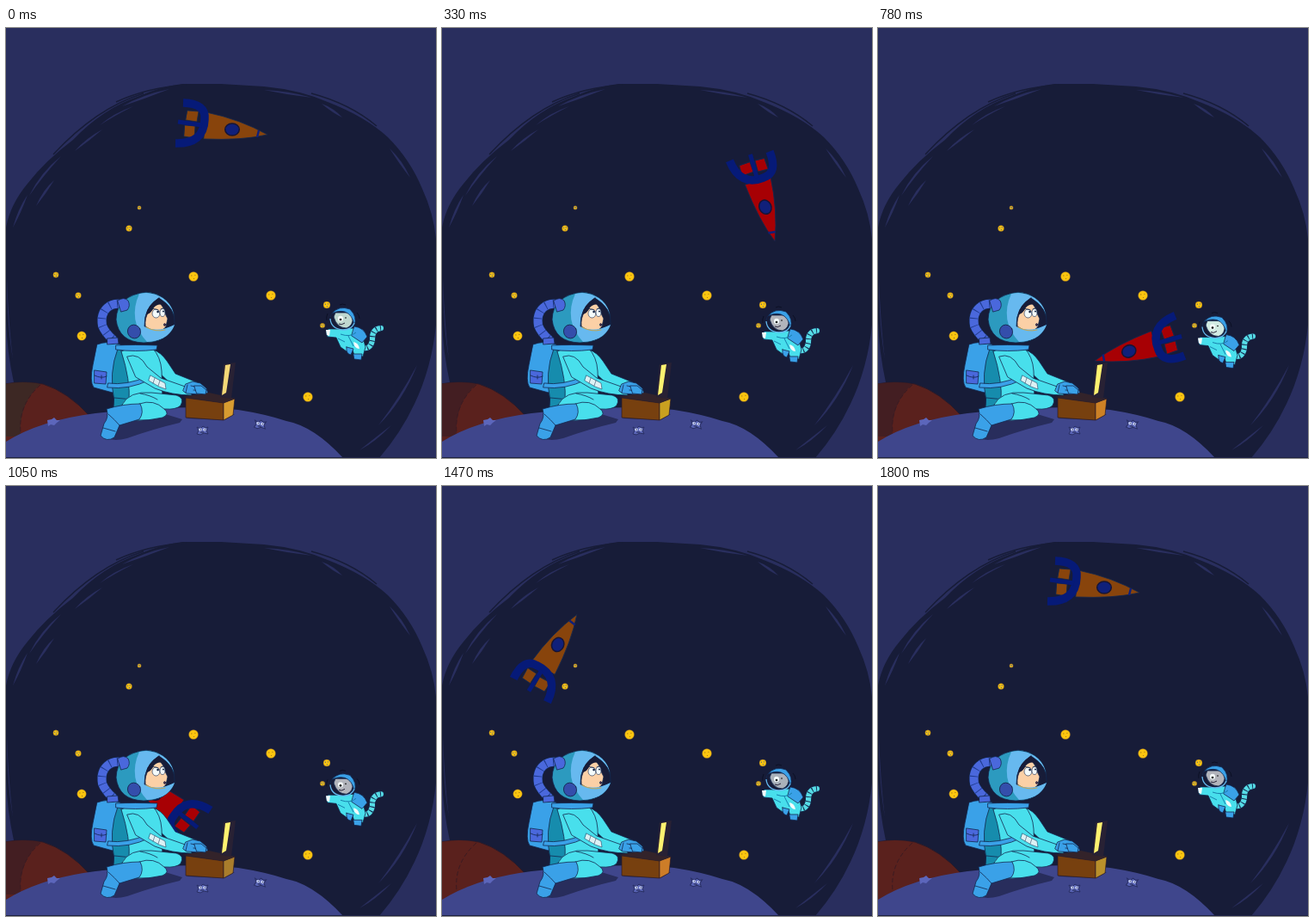
Recreate the animation shown at these times as an HTML page. Size 500 by 500 pixels, loop 1830 ms.

```html
<!DOCTYPE html>
<html lang="en">
<head>
<meta charset="utf-8">
<title>Astronaut and orbiting rocket</title>
<style>
  html, body { margin: 0; width: 100%; height: 100%; overflow: hidden; background: #292e5e; }
  svg { display: block; width: 100vw; height: 100vh; }
  .ink { stroke: #14284e; stroke-width: .8; stroke-linejoin: round; stroke-linecap: round; }
  .line { fill: none; }
  .cyan { fill: #48dfec; }
  .teal { fill: #168cad; }
  .blue { fill: #3aa1e8; }
  .indigo { fill: #4a68dc; }
  .night { fill: #171c38; }
  .white { fill: #f4fbfb; }
</style>
</head>
<body>
<svg viewBox="0 0 500 500">
  <rect width="500" height="500" fill="#292e5e"/>

  <!-- Sky with brushed rim -->
  <path class="night" d="M0 232Q5 205 25 181Q46 154 78 130Q112 94 155 79Q180 68 205 65L250 65L300 68Q342 72 374 86Q418 103 444 127Q470 153 484 187Q497 215 500 245V345Q495 395 475 437Q459 471 434 500H60L9 412Q1 375 0 340Z"/>
  <g fill="#292e5e">
    <path d="M135 91Q160 77 190 71Q162 82 135 91ZM109 113Q125 99 148 91Q126 102 109 113ZM300 72Q328 73 356 81Q328 78 300 72ZM367 88Q381 93 391 104Q380 99 367 88ZM27 195Q40 168 64 149Q43 172 27 195ZM35 207Q43 188 56 177Q47 192 35 207ZM80 143Q93 128 112 118Q97 131 80 143ZM446 140Q461 154 470 174Q458 159 446 140ZM8 232Q14 210 25 194Q18 214 8 232Z"/>
    <path d="M1 290Q1 345 8 385Q3 345 1 290ZM478 392Q462 433 433 462Q457 431 478 392ZM448 462Q430 481 411 491Q431 475 448 462Z"/>
  </g>
  <path class="line" stroke="#171c38" stroke-width="1.500" d="M55 147Q105 93 160 76M128 86Q165 69 210 66M355 76Q400 88 431 114"/>

  <g id="stars"></g>

  <g id="rocket">
    <path class="body ink" d="M211 96L224 97L222 109L209 107ZM208 113L220 114L219 128L207 126Z"/>
    <path class="body ink" d="M233 98Q272 106 304 124Q274 131 230 129Z"/>
    <path class="line" stroke="#061a78" stroke-width="9.500" d="M206 87Q233 88 231 106Q230 135 197 134"/>
    <path class="line" stroke="#061a78" stroke-width="5" d="M200 109L228 113"/>
    <ellipse cx="263" cy="118" rx="8.300" ry="7" fill="#10207a" stroke="#161536" stroke-width="1.500"/>
    <path class="line" stroke="#10207a" stroke-width="2.500" d="M294 119L292 127"/>
  </g>

  <!-- Hill and ground -->
  <path fill="#5a211d" stroke="#2b1a28" d="M-2 414Q20 410 43 414Q72 423 98 452L80 490H-2Z"/>
  <path id="shade" d="M-1 414Q20 410 40 414Q14 438 17 475H-1Z"/>
  <path class="line" stroke="#3a1b22" d="M40 415Q14 438 17 470" stroke-dasharray="5 3"/>
  <path fill="#3f468c" d="M0 481Q40 456 104 448Q200 437 270 444Q302 449 326 457Q358 463 392 500H0Z"/>
  <path fill="#282d5c" d="M112 474Q122 482 141 477Q172 466 202 459L205 455L182 448L130 455Z"/>
  <path fill="#282d5c" d="M209 454L254 456L266 449L230 447Z"/>
  <rect y="499" width="500" height="1" fill="#1d2143"/>
  <path fill="#5c66bb" d="M48 456L53 455L56 453L59 456L63 456L59 459L56 462L52 461L49 463Z"/>
  <g id="critters"></g>

  <!-- Cat -->
  <g id="cat">
    <g class="line">
      <path stroke="#14284e" stroke-width="7.500" stroke-linecap="round" d="M415 372Q424 374 426 363Q425 350 436 349"/>
      <path stroke="#56dce6" stroke-width="6" stroke-linecap="round" d="M415 372Q424 374 426 363Q425 350 436 349"/>
      <path stroke="#14284e" stroke-width="6" stroke-dasharray="1 4" d="M415 372Q424 374 426 363Q425 350 436 349"/>
    </g>
    <path class="cyan ink" d="M386 350L404 349Q416 358 418 371L415 382L405 381L403 374L396 376L389 371L384 360L374 359Q370 352 375 350Z"/>
    <path class="blue ink" d="M405 347Q416 348 420 359L414 366L402 358Z"/>
    <path class="white" d="M372 351L377 351L376 358L373 357ZM404 365Q410 366 411 373Q405 373 404 365Z"/>
    <path class="line" stroke="#1780ad" d="M389 356Q400 360 407 354M398 358L404 370M386 361L394 365"/>
    <path class="blue ink" d="M396 371L404 373L401 380Q395 379 396 371ZM404 379L414 379L413 386L405 385Z"/>
    <ellipse class="night ink" cx="391" cy="338" rx="14" ry="12.500"/>
    <path id="face" class="ink" d="M381 336L383 331L388 331L395 331L401 331L403 336Q404 346 396 349Q385 349 381 336Z"/>
    <path class="blue ink" d="M379 332Q387 322 400 327Q409 336 405 346Q403 333 394 330Q386 328 379 332Z"/>
    <ellipse class="white" cx="389" cy="338" rx="3" ry="3.200"/>
    <circle cx="389" cy="339" r="1.300"/><circle cx="395" cy="337" r=".8"/>
    <path class="line" stroke="#282338" d="M387 344Q390 346 394 343"/>
    <path class="line" stroke="#65b8ed" stroke-width="1.300" d="M377 338Q378 350 392 351Q402 351 405 343"/>
    <path class="line" stroke="#0c1024" d="M388 322Q391 320 395 322M408 331Q411 334 411 338M374 332Q372 336 373 340"/>
  </g>

  <!-- Seated astronaut -->
  <g class="ink">
    <path class="cyan" d="M171 374Q180 377 187 387L197 402L222 412L218 423L194 416L174 397Z"/>
    <path class="blue" d="M106 368Q118 363 133 368L134 410L124 424L102 418Q97 411 101 392Z"/>
    <path class="indigo" d="M103 398L117 400L116 414L103 413Z"/>
    <path class="line" d="M103 404Q111 408 117 405M111 404V408"/>
    <path class="teal" d="M130 373L143 371L145 434L126 434Q119 401 130 373Z"/>
    <path class="cyan" d="M134 376Q150 368 170 372Q180 382 181 399L182 432L143 435Q145 410 134 376Z"/>
    <path class="blue" d="M128 369Q149 368 176 369L175 374Q150 377 128 374Z"/>
    <path class="blue" d="M119 413Q140 416 165 405L167 409Q144 421 118 418Z"/>
    <path class="teal" d="M126 430L147 432L142 445L125 444Z"/>
    <path class="cyan" d="M135 438Q143 422 169 424L198 427Q208 430 203 439Q198 444 184 443Q191 449 182 453Q166 457 150 456Z"/>
    <path class="line" d="M155 437Q172 431 184 443M156 425Q168 427 176 432"/>
    <path class="blue" d="M117 443Q136 437 156 437Q161 447 155 455L132 462L126 476Q117 482 110 474L114 460Q120 453 117 443Z"/>
    <path class="line" d="M119 449Q127 456 132 462M113 465L127 469"/>
    <path class="cyan" d="M141 382Q155 377 164 394L180 407L214 419L216 427Q193 427 173 419L151 406Z"/>
    <path fill="#dcf1f4" stroke-width=".5" d="M168 404L185 413L186 420L178 417L166 410Z"/>
    <path class="line" stroke-width=".5" d="M173 407L171 413M179 410L177 416"/>
    <path class="blue" d="M209 414L217 411L226 413L233 419L235 425L226 426L210 425L206 422Z"/>
    <path class="line" d="M215 416L229 419M218 421L231 422M211 415L209 424"/>
  </g>

  <!-- Air hose -->
  <g class="line" stroke-linecap="round">
    <path stroke="#14284e" stroke-width="11.500" d="M139 322C121 317 109 328 112 346Q115 354 124 362"/>
    <path stroke="#4a68dc" stroke-width="10" d="M139 322C121 317 109 328 112 346Q115 354 124 362"/>
    <path stroke="#203c91" stroke-width="10" stroke-linecap="butt" stroke-dasharray="1 8" d="M139 322C121 317 109 328 112 346Q115 354 124 362"/>
  </g>
  <path class="indigo ink" d="M118 361L130 360L131 367L118 368Z"/>

  <!-- Helmet and face -->
  <g class="ink">
    <path fill="#2c9abf" d="M163 307Q187 309 195 331L196 346Q187 366 160 366Q131 365 128 339Q129 311 163 307Z"/>
    <path fill="#67b9ef" stroke="none" d="M163 308Q187 310 194 329L195 347Q186 364 164 365Q141 340 155 309Z"/>
    <path class="indigo" d="M130 317Q137 312 142 317Q145 323 141 328L134 330Z"/>
    <path class="night" d="M178 314Q160 325 161 347Q174 356 196 345Q198 326 178 314Z"/>
    <path fill="#fbd0a6" d="M162 347Q161 337 166 330L176 317Q184 324 186 334L188 338L186 347Q183 352 176 352Q168 352 162 347Z"/>
    <path class="night" stroke="none" d="M163 333Q165 322 177 314Q183 317 185 323Q177 319 172 325Q169 332 163 333Z"/>
    <path fill="#67b9ef" stroke="none" d="M161 347Q177 355 196 345Q190 360 175 363Z"/>
    <path class="line" stroke="#d9a12c" d="M163 348Q174 354 185 351"/>
    <g stroke-width=".6">
      <ellipse class="white" cx="174.500" cy="332" rx="4.500" ry="5"/>
      <ellipse class="white" cx="182" cy="331" rx="3" ry="4.500"/>
    </g>
    <path class="line" d="M170 326L177 328M180 327L184 325"/>
    <ellipse cx="184.500" cy="345" rx="1" ry="1.500" fill="#71323c"/>
    <circle cx="176.500" cy="330" r=".9" fill="#080b18"/>
    <circle cx="183" cy="329.500" r=".7" fill="#080b18"/>
    <ellipse cx="149" cy="353" rx="7.500" ry="8" fill="#344eab" transform="rotate(-25 149 353)"/>
  </g>

  <!-- Box and laptop -->
  <path fill="#77400f" stroke="#2c1b27" stroke-width=".7" d="M209 430L253 436V456L209 453Z"/>
  <path id="side" stroke="#2c1b27" stroke-width=".7" d="M253 436L266 431L264 450L253 456Z"/>
  <path fill="#33232a" d="M205 429L236 424L267 431L253 436Z"/>
  <path fill="#282134" d="M253 391L267 389L262 431L249 429Z"/>
  <path id="screen" d="M255 392L261 391L256 424L251 427Z"/>
  <path class="blue ink" d="M219 416L227 416L233 421L232 426L222 425Z"/>
</svg>

<script>
const $ = id => document.getElementById(id);
const LOOP = 1830, STEP = 30, ORBIT = 1800;

$('stars').innerHTML = [
  [218, 289, 5.5], [308, 311, 5.5], [88, 358, 5.3], [351, 429, 5.5], [143, 233, 3.5],
  [155, 209, 2.2], [58, 287, 3.2], [84, 311, 3.4], [373, 322, 4], [368, 346, 2.8]
].map(([x, y, r]) => {
  const dot = (dx, dy) => `<circle cx="${x + dx * r}" cy="${y + dy * r}" r=".6"/>`;
  return `<circle cx="${x}" cy="${y}" r="${r}" fill="#fcc60f" stroke="#6d4b35" stroke-width=".4"/>
    <g fill="${r < 5 ? '#435497' : '#9e711a'}">${dot(-.4, -.2)}${dot(.35, -.3)}${dot(.1, .45)}</g>`;
}).join('');

$('critters').innerHTML = [[228, 468, 0], [295, 461, 8]].map(([x, y, turn]) =>
  `<g transform="translate(${x} ${y}) rotate(${turn})">
    <path d="M-6 4L-4 0L-6-4L-2-2L1-5L4-3L7-4L5 0L7 4L2 3L-2 5Z" fill="#5964b6" stroke="#282e62"/>
    <ellipse cx="-2" cy="-1" rx="2" ry="1.7" fill="#bfc8ed"/>
    <ellipse cx="3" cy="-1" rx="2" ry="1.7" fill="#bfc8ed"/>
    <path d="M-2-1h1M3-1h1M-2 2h4" stroke="#222951"/>
  </g>`).join('');

// Start time, rocket, hill shade, cat face, box side, screen
const moods = [
  [0, '#88440c', '#3d2824', '#c0d8d0', '#d89c30', '#f4d877'],
  [165, '#a70004', '#431e22', '#b2b4bb', '#c9a020', '#fff270'],
  [450, '#a70004', '#431e22', '#c5e4e4', '#c9a522', '#fff270'],
  [675, '#a70004', '#431e22', '#d2eae2', '#cd8125', '#fff270'],
  [915, '#a70004', '#431e22', '#b2b4bb', '#a97d2c', '#fff270'],
  [1260, '#88440c', '#5a211d', '#a9b1ba', '#cd7d28', '#fff270'],
  [1635, '#88440c', '#5a211d', '#b2b4bb', '#b9902b', '#fff270']
];
const bodies = document.querySelectorAll('.body');

function draw(now) {
  const t = Math.floor(now % LOOP / STEP) * STEP;
  const turn = t / ORBIT;
  const [, ship, shade, face, side, screen] = moods.findLast(m => m[0] <= t);
  bodies.forEach(b => b.setAttribute('fill', ship));
  Object.entries({ shade, face, side, screen }).forEach(([id, color]) => $(id).setAttribute('fill', color));
  $('rocket').setAttribute('transform', `rotate(${turn * 360} 250 250)`);
  $('cat').setAttribute('transform', `translate(0 ${5 - 5 * Math.cos(turn * 2 * Math.PI)})`);
}

const start = performance.now();
function tick() {
  draw(performance.now() - start);
  requestAnimationFrame(tick);
}
tick();
</script>
</body>
</html>
```
